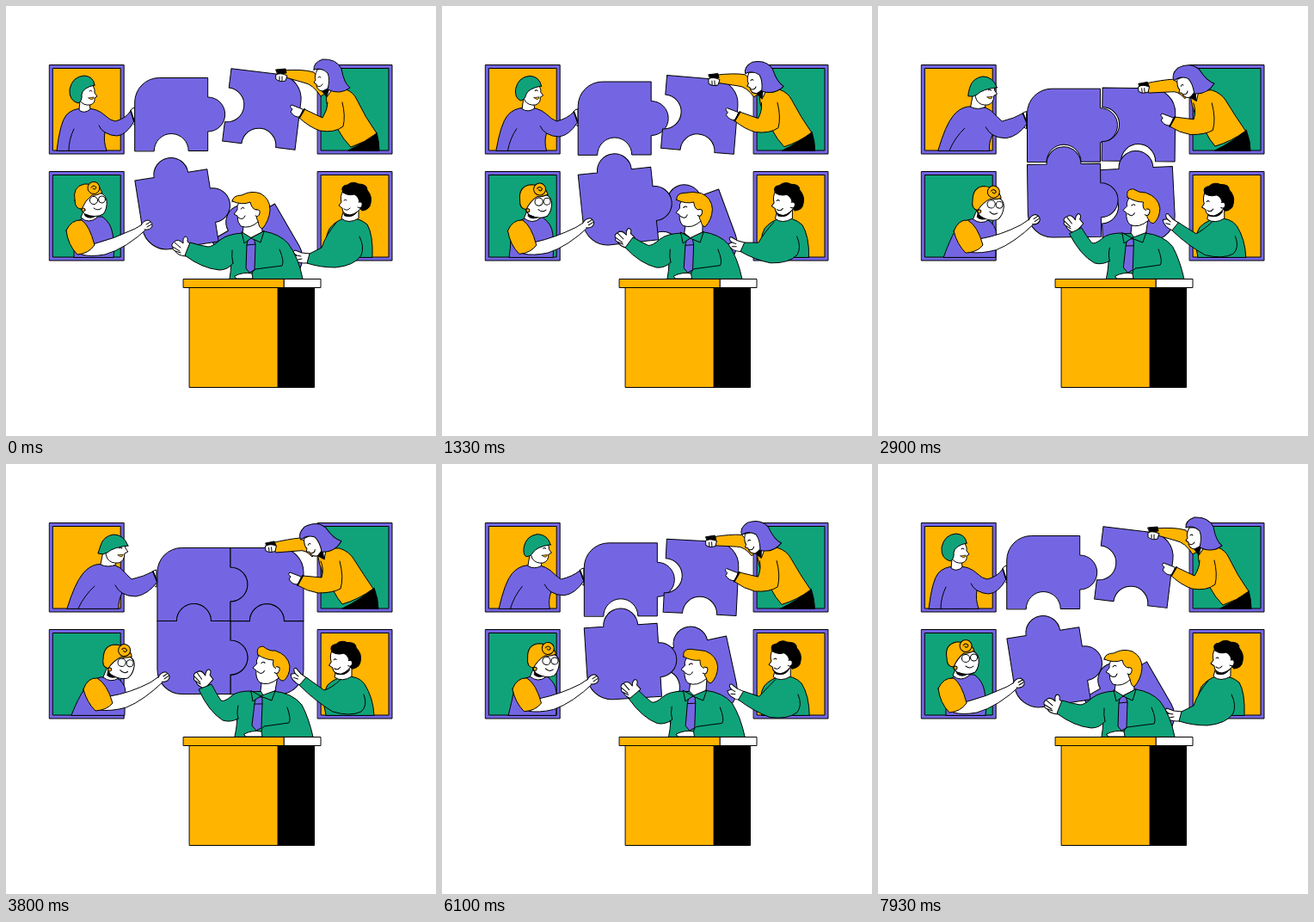
Recreate the animation shown at these times as an HTML page. Size 500 px wide and 500 px high, loop 8.01 s.

```html
<!DOCTYPE html>
<html lang="en">
<head>
<meta charset="utf-8">
<title>Teamwork puzzle</title>
<style>
html, body { margin: 0; width: 100%; height: 100%; overflow: hidden; background: #fff; }
svg { display: block; width: 100vw; height: 100vh; }
</style>
</head>
<body>
<svg id="stage" viewBox="0 0 500 500" stroke="#000" stroke-width="1" stroke-linejoin="round" stroke-linecap="round"></svg>
<script>
const LOOP = 8010;
const YELLOW = '#ffb400', GREEN = '#10a37a', PURPLE = '#7466e3', WHITE = '#fff', BLACK = '#000', NONE = 'none';
const stage = document.getElementById('stage');
const updates = [];

function add(parent, tag, attrs) {
  const el = document.createElementNS('http://www.w3.org/2000/svg', tag);
  for (const key in attrs) el.setAttribute(key, attrs[key]);
  return parent.appendChild(el);
}

const lerp = (a, b, k) => a + (b - a) * k;

// Blends the numbers of two paths that share the same commands.
function blend(from, to, k) {
  const ends = to.match(/-?\d+(\.\d+)?/g);
  let i = 0;
  return from.replace(/-?\d+(\.\d+)?/g, n => lerp(+n, +ends[i++], k).toFixed(2));
}

function shape(parent, fill, from, to, width = 1) {
  const el = add(parent, 'path', { d: from, fill, 'stroke-width': width });
  if (to) updates.push(k => el.setAttribute('d', blend(from, to, k)));
}

// A rigid part that shifts by (dx, dy) while turning about (cx, cy).
function part(cx, cy, dx, dy, turn) {
  const el = add(stage, 'g', {});
  updates.push(k => el.setAttribute('transform',
    `translate(${dx * k} ${dy * k}) rotate(${turn * k} ${cx} ${cy})`));
  return el;
}

function rect(x, y, width, height, fill) {
  add(stage, 'rect', { x, y, width, height, fill });
}

function dot(parent, cx, cy, r, fill) {
  add(parent, 'circle', { cx, cy, r, fill });
}

function pane(x, y, fill) {
  rect(x, y, 86.5, 103.5, PURPLE);
  rect(x + 4, y + 4, 78.5, 95.5, fill);
}

function piece(d, cx, cy, dx, dy, angle, bow = 0) {
  const el = add(stage, 'path', { d, fill: PURPLE });
  updates.push(k => {
    const x = cx + dx * (1 - k) - bow * Math.sin(Math.PI * k);
    el.setAttribute('transform', `translate(${x} ${cy + dy * (1 - k)}) rotate(${angle * (1 - k)})`);
  });
}

function drawPieces() {
  const out = 'A20 20 0 0 1 ', dent = 'A20 20 0 0 0 ', round = 'A28.5 28.5 0 0 1 ';
  piece(`M-42.5 42.5V-14${round}-14 -42.5H42.5V-20${out}42.5 20V42.5H20${dent}-20 42.5Z`, 218.5, 140, -26.3, -14, 0);
  piece(`M-42.5 42.5V20${dent}-42.5 -20V-42.5H14${round}42.5 -14V42.5H20${dent}-20 42.5Z`, 303.5, 140, -4.5, -20, 7);
  piece(`M-42.5 42.5V20${dent}-42.5 -20V-42.5H-20${out}20 -42.5H42.5V14${round}14 42.5Z`, 303.5, 225, -6.5, 63, -30, 3);
  piece(`M-42.5 14V-42.5H-20${out}20 -42.5H42.5V-20${out}42.5 20V42.5H-14${round}-42.5 14Z`, 218.5, 225, -20, 13.4, -9);
}

function drawTopLeftMan() {
  shape(part(147, 128, 25, 5, 0), WHITE, 'M144 123Q146 118 150 118V138Q147 138 146 132Z');
  shape(stage, PURPLE,
    'M59 168Q63 135 70 127Q77 119 90 119Q106 118 116 128Q121 133 127 134Q139 131 145 122L149 134Q140 150 129 151Q122 151 115 147Q113 157 117 168Z',
    'M71 168Q80 139 89 128Q96 119 105 117Q123 114 133 121Q141 129 146 134Q160 131 171 125L176 137Q165 152 151 154Q141 154 135 150Q130 160 131 168Z');
  shape(stage, NONE, 'M79 143Q73 155 73 168', 'M103 142Q91 153 84 168');
  shape(stage, NONE, 'M115 147Q110 144 108 139', 'M135 150Q130 147 127 141');
  shape(stage, NONE, 'M145 122L149 134', 'M171 125L176 137', 1.8);
  shape(stage, WHITE, 'M86 110L85 121Q91 126 98 120L97 112Z', 'M113 102L110 117Q119 121 128 117L126 110Z');
  shape(stage, WHITE,
    'M84 92Q92 85 101 92Q104 98 103 101L106 105L103 107Q104 113 98 115Q90 116 86 110Q82 100 84 92Z',
    'M117 94Q126 86 136 91Q140 95 139 98L142 102L138 104Q138 113 131 115Q122 116 118 110Q114 102 117 94Z');
  shape(stage, GREEN,
    'M103 92Q102 82 91 81Q77 82 74 97Q73 110 84 113Q89 110 88 103Q89 95 103 92Z',
    'M142 95Q137 82 125 82Q113 84 110 95Q108 101 107 104Q113 106 118 103Q124 97 142 95Z');
  const face = part(98, 104, 34.5, -1, 4);
  shape(face, YELLOW, 'M96 107L102 106Q101 111 96 107Z', null, .7);
  shape(face, NONE, 'M97 99Q98 97 100 99');
}

function drawBottomLeftWoman() {
  shape(stage, PURPLE,
    'M79 292Q80 270 73 262Q80 249 95 245H112Q122 252 124 265Q127 280 125 292Z',
    'M76 292Q84 272 91 262Q96 251 110 248H128Q139 255 139 265Q138 280 138 292Z');
  shape(stage, WHITE,
    'M101 277Q125 271 150 259L160 253L166 257Q140 282 115 289Q98 292 88 289Z',
    'M121 270Q145 266 168 254L178 247L184 252Q160 275 140 283Q122 288 108 286Z');
  const hand = part(163, 255, 20, -7, -4);
  shape(hand, WHITE, 'M157 255Q160 249 166 249Q171 252 170 256Q168 261 161 260');
  shape(hand, NONE, 'M163 254L168 251M164 257L169 254');
  shape(stage, YELLOW,
    'M70 261Q76 248 88 249Q97 255 103 278Q96 288 83 289Q72 278 70 261Z',
    'M90 262Q95 248 106 249Q118 256 124 278Q118 286 104 287Q94 277 90 262Z');
  shape(stage, WHITE, 'M91 236L87 246Q96 254 106 246L106 240Z', 'M118 236L113 248Q122 255 131 249L130 244Z');
  shape(stage, BLACK, 'M92 240Q100 245 106 243Q98 249 92 244Z', 'M119 241Q125 247 130 247Q123 250 118 246Z');
  const head = part(98, 225, 33, 4, 12);
  shape(head, WHITE, 'M84 222Q85 238 92 242Q104 247 113 242Q118 236 117 226Q115 216 104 217Z');
  shape(head, YELLOW, 'M80 226Q77 210 91 207Q108 206 112 217Q104 221 100 220Q92 226 88 236Q80 236 80 226Z');
  dot(head, 102, 211.5, 7, YELLOW);
  shape(head, NONE, 'M99 211Q102 207 105 211Q103 215 101 212');
  dot(head, 102, 226, 4.6, NONE);
  dot(head, 111.5, 225, 4, NONE);
  dot(head, 90, 237, 2, YELLOW);
  shape(head, NONE, 'M102 235Q107 239 111 235');
}

function drawTopRightWoman() {
  shape(stage, BLACK,
    'M398 168Q415 160 431 147Q434 158 434 168Z',
    'M391 168Q412 158 428 144Q433 157 433 168Z');
  shape(stage, YELLOW,
    'M321 75Q345 73 358 77L374 100L366 105Q357 91 346 89L325 83Z',
    'M308 92Q330 87 342 86L362 101L356 108Q348 99 340 101L314 103Z');
  shape(stage, BLACK, 'M314 74L325 73L326 78L316 79Z', 'M302 92L312 90L314 95L304 97Z');
  const grip = part(320, 82, -12.5, 15, -6);
  shape(grip, WHITE, 'M314 80Q319 77 327 81L325 87Q318 89 314 85Z');
  shape(grip, NONE, 'M318 82V87M321 82V87');
  shape(stage, YELLOW,
    'M372 100Q385 95 395 97Q404 100 408 109Q418 130 431 148Q417 159 401 164Q392 155 385 142Q372 125 372 100Z',
    'M362 104Q375 97 388 98Q399 102 404 110Q416 129 427 145Q411 157 391 163Q385 156 380 146Q366 130 362 104Z');
  const head = part(375, 85, -12, 6, -25);
  shape(head, WHITE, 'M362 74Q358 82 360 86L358 89L361 91Q361 98 368 99L373 106L380 96L378 74Z');
  shape(head, BLACK, 'M368 99L376 95L373 105Z');
  shape(head, PURPLE, 'M358 74Q357 66 368 62Q384 61 390 73Q393 90 400 95Q388 104 374 97Q377 85 374 78Q367 71 358 74Z');
  shape(head, NONE, 'M362 93Q366 95 368 91M363 83Q365 81 366 83');
  shape(part(337, 122, -2, 11, 0), WHITE, 'M345 120L332 115Q329 117 333 120L331 123Q335 130 342 129Z');
  shape(stage, YELLOW,
    'M374 112Q374 121 368 130L347 120L341 130Q353 141 365 145Q382 148 392 140Q395 128 391 112',
    'M366 113Q370 122 367 132L345 130L339 141Q350 148 363 150Q380 150 389 145Q393 132 388 113');
  shape(stage, NONE, 'M341 130L347 120', 'M339 141L345 130', 2);
}

function drawBottomRightMan() {
  shape(stage, GREEN,
    'M371 292Q370 270 376 259Q383 250 393 247Q408 244 420 254Q427 266 426 292Z',
    'M372 292Q366 268 374 257Q382 249 394 247Q410 246 417 256Q427 272 428 292Z');
  const hand = part(350, 293, -5, -41, 30);
  shape(hand, WHITE, 'M354 288L344 287L336 284Q332 286 338 290L334 293Q338 300 351 299Z');
  shape(hand, NONE, 'M338 290L343 291M339 295L344 294');
  shape(stage, GREEN,
    'M384 252Q372 266 367 281L353 288L350 299Q365 304 383 304Q405 302 413 290Q417 280 411 268',
    'M390 250Q378 261 370 263L349 248L341 257Q360 276 380 288Q400 294 413 288Q421 281 416 268');
  shape(stage, WHITE, 'M393 236L390 247Q398 254 410 247V236Z', 'M384 238L382 248Q391 254 402 247V236Z');
  shape(stage, BLACK, 'M393 241Q403 245 409 238Q404 247 394 244Z', 'M384 241Q394 245 400 239Q395 247 384 244Z');
  const head = part(404, 225, -12, 1, -4);
  shape(head, WHITE, 'M392 214Q388 222 390 228L387 232L391 235Q391 242 400 243Q410 241 414 232L410 212Z');
  shape(head, BLACK, 'M392 217Q388 209 397 208Q403 203 410 207Q420 207 420 214Q426 221 424 229Q423 237 414 238Q411 236 411 230Q411 222 405 219Q398 221 392 217Z');
  shape(head, WHITE, 'M410 228Q415 227 414 232Q413 236 409 234');
  shape(head, NONE, 'M393 236Q397 239 400 235M393 226Q395 224 396 226');
}

function drawPresenter() {
  shape(stage, GREEN,
    'M260 317Q263 300 261 286Q261 270 272 265L300 262Q318 265 328 276Q340 292 345 317Z',
    'M266 317Q270 300 268 286Q270 270 282 265L310 264Q333 266 344 280Q352 295 357 317Z');
  const thumb = part(211, 283, 24, -29, 14);
  shape(thumb, WHITE, 'M216 278L211 274Q212 268 208 268Q205 270 206 276Q200 270 196 274Q191 277 194 281Q193 284 197 285Q199 290 209 291Z');
  shape(thumb, NONE, 'M196 275L203 281M194 280L202 285M197 285L203 287');
  shape(stage, GREEN,
    'M275 264Q258 265 249 272Q240 280 235 280Q224 278 214 275L208 290Q228 305 248 307Q258 307 264 299',
    'M284 264Q268 264 262 270Q254 277 250 275Q244 266 239 256L224 262Q236 288 252 298Q261 301 270 296');
  shape(stage, NONE, 'M264 299Q262 292 263 284', 'M270 296Q268 290 270 281');
  shape(stage, WHITE, 'M277 250L275 264L284 270L298 263L297 248Z', 'M298 248L296 264L300 270L313 264L316 246Z');
  shape(stage, PURPLE, 'M282 270L288 269L290 277L289 307L283 310L279 305L280 278Z', 'M291 271L298 271L298 279L297 307L291 310L286 304L289 279Z');
  shape(stage, NONE, 'M280 278L290 277', 'M289 279L298 279');
  shape(stage, GREEN, 'M274 263L277 276L285 270Z', 'M285 264L287 276L296 270Z');
  shape(stage, GREEN, 'M285 270L296 275L300 262Z', 'M296 270L309 275L313 264Z');
  shape(stage, NONE, 'M318 283Q324 297 321 302L290 306Q286 308 286 311', 'M327 283Q332 297 329 301L300 305Q297 307 297 311');
  shape(stage, WHITE, 'M266 314Q275 309 286 311L287 317H268Z', 'M277 314Q286 309 297 311L298 317H279Z');
  shape(stage, WHITE,
    'M271 228Q268 233 269 237L265 242L269 244Q269 252 273 256Q284 260 294 250L296 230L284 225Z',
    'M295 222Q290 228 292 232L287 237L291 240Q290 249 295 254Q305 259 317 249L318 230L308 224Z');
  shape(stage, YELLOW,
    'M263 227Q264 220 274 220Q285 214 296 218Q307 224 307 237Q306 250 298 259Q294 258 293 250Q290 246 292 237Q286 237 284 228Q275 232 263 227Z',
    'M293 222Q290 212 299 212Q306 218 313 217Q328 222 330 235Q330 246 323 252Q318 252 317 248Q314 246 315 238Q309 237 311 228Q303 228 293 222Z');
  const face = part(281, 241, 23, -3, 10);
  shape(face, WHITE, 'M291 237Q296 236 295 241Q294 246 290 244');
  shape(face, NONE, 'M270 246Q276 250 278 244M273 236Q275 233 277 235');
}

function drawDesk() {
  rect(213.5, 327.5, 103, 116, YELLOW);
  rect(316.5, 327.5, 42, 116, BLACK);
  rect(206.5, 317.5, 117, 10, YELLOW);
  rect(323.5, 317.5, 42.5, 10, WHITE);
}

pane(50.7, 68.5, YELLOW);
pane(50.7, 192.5, GREEN);
pane(362.5, 68.5, GREEN);
pane(362.5, 192.5, YELLOW);
drawTopLeftMan();
drawPieces();
drawBottomLeftWoman();
drawTopRightWoman();
drawBottomRightMan();
drawPresenter();
drawDesk();

// Ease in and out along a cubic Bezier (.37, 0, .43, 1).
function ease(x) {
  let low = 0, high = 1;
  for (let i = 0; i < 24; i++) {
    const u = (low + high) / 2, v = 1 - u;
    if (3 * v * v * u * .37 + 3 * v * u * u * .43 + u * u * u < x) low = u;
    else high = u;
  }
  return low * low * (3 - 2 * low);
}

function render(time) {
  const phase = (time % LOOP) / (LOOP / 2);
  const k = ease(phase < 1 ? phase : 2 - phase);
  updates.forEach(update => update(k));
}

const start = performance.now();
function tick() {
  render(performance.now() - start);
  requestAnimationFrame(tick);
}
tick();
</script>
</body>
</html>
```
